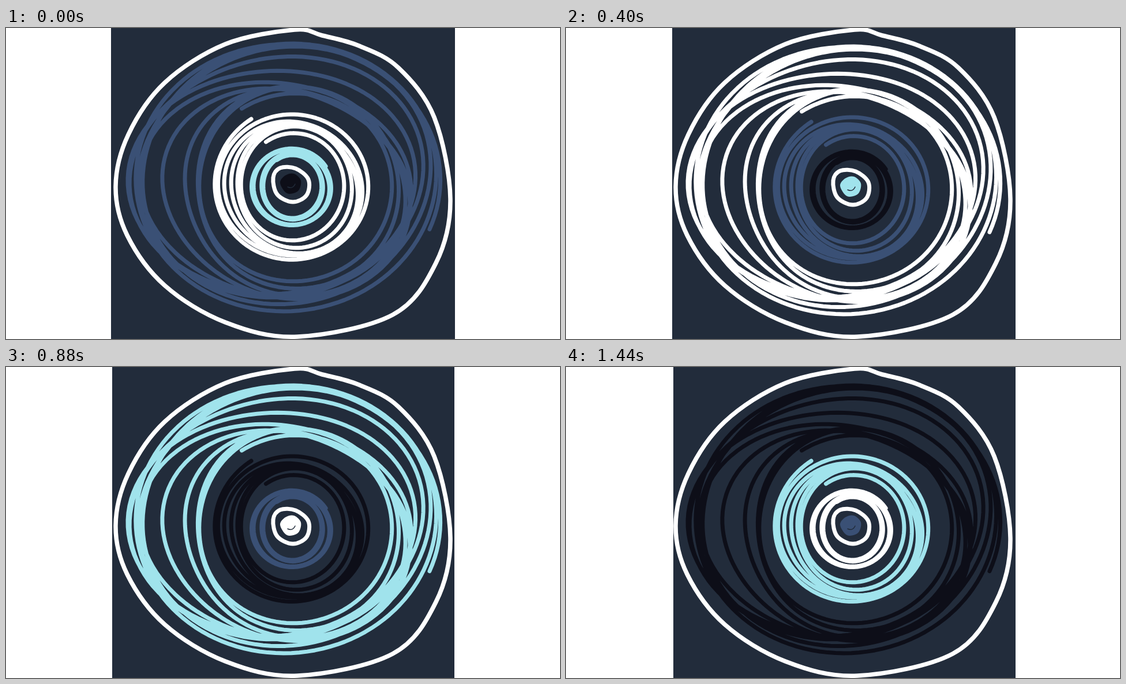
An HTML page with a canvas that plays this animation: 960x540 px, repeating every 1520 ms.

```html
<!DOCTYPE html>
<html lang="en">
<head>
<meta charset="utf-8">
<title>Scribbled eye</title>
<style>
html, body { margin: 0; width: 100%; height: 100%; overflow: hidden; background: #fff; }
canvas { display: block; }
</style>
</head>
<body>
<canvas id="stage" width="960" height="540"></canvas>
<script>
const ctx = document.getElementById('stage').getContext('2d');
const WHITE = '#fff', NAVY = '#222c3b', BLUE = '#3a5075', CYAN = '#a0e3ec', BLACK = '#0d0e18';
const FRAME = 80, LOOP = 1520, TURN = 2 * Math.PI;

// Colours run from the outside in; the panel's edges drift over each phase.
const phases = [
  { start: 0, length: 400, colors: [BLUE, WHITE, CYAN, BLACK], shift: -5, left: [182, 185], right: [778, 778] },
  { start: 400, length: 480, colors: [WHITE, BLUE, BLACK, CYAN], shift: 0, left: [184, 186], right: [779, 775] },
  { start: 880, length: 320, colors: [CYAN, BLACK, BLUE, WHITE], shift: 0, left: [184, 185], right: [777, 775] },
  { start: 1200, length: 320, colors: [BLACK, CYAN, WHITE, BLUE], shift: 0, left: [184, 186], right: [778, 779] }
];

const lerp = (a, b, t) => a + (b - a) * t;

// Smooth closed curve through points (Catmull-Rom as Beziers).
function blob(points) {
  const n = points.length, path = new Path2D();
  path.moveTo(...points[0]);
  for (let i = 0; i < n; i++) {
    const [a, b, c, d] = [n - 1, 0, 1, 2].map(k => points[(i + k) % n]);
    path.bezierCurveTo(b[0] + (c[0] - a[0]) / 6, b[1] + (c[1] - a[1]) / 6,
      c[0] - (d[0] - b[0]) / 6, c[1] - (d[1] - b[1]) / 6, c[0], c[1]);
  }
  path.closePath();
  return path;
}

// A pen winding clockwise from an inner to an outer ellipse [cx, cy, rx, ry].
// power > 1 gathers the loops midway, power < 1 gathers them at both rims;
// swing makes them wander across each other between the rims.
function scribble(inner, outer, turns, power, swing) {
  const path = new Path2D(), steps = turns * 120;
  for (let i = 0; i <= steps; i++) {
    const u = i / steps, v = 2 * u - 1, angle = u * turns * TURN;
    const wander = Math.sin(0.9 * angle) + 0.6 * Math.sin(2.1 * angle);
    const depth = 0.5 + 0.5 * Math.sign(v) * Math.abs(v) ** power
      + swing * Math.sin(Math.PI * u) * wander;
    const [cx, cy, rx, ry] = inner.map((value, k) => lerp(value, outer[k], depth));
    const heading = angle + 0.66 * TURN;
    path.lineTo(cx + rx * Math.cos(heading), cy + ry * Math.sin(heading));
  }
  return path;
}

const outerLoops = scribble([498, 280, 167, 160], [482, 268, 271, 235], 10.4, 1, 0.28);
const middleLoops = scribble([496, 278, 85, 89], [499, 277, 138, 135], 6, 1.4, 0.16);
const innerLoops = scribble([496, 280, 50, 54], [495, 281, 70, 67], 4.25, 0.35, 0.08);

const outline = blob([
  [500, 3], [548, 13], [612, 31], [680, 69], [742, 155], [770, 297], [745, 408],
  [670, 498], [505, 536], [380, 511], [275, 447], [210, 360], [190, 275],
  [212, 185], [275, 95], [380, 28]
]);
const ring = blob([[475, 248], [502, 249], [524, 268], [521, 295], [497, 307], [470, 294], [463, 265]]);
const pupil = blob([[484, 261], [499, 258], [511, 270], [506, 288], [487, 292], [475, 274]]);
const tick = new Path2D('M488 281 Q497 285 501 276');

function stroke(path, color, width) {
  ctx.strokeStyle = color;
  ctx.lineWidth = width;
  ctx.stroke(path);
}

function draw(now) {
  const time = Math.floor(now % LOOP / FRAME) * FRAME;
  const phase = phases.findLast(p => p.start <= time);
  const progress = (time - phase.start) / (phase.length - FRAME);
  const [left, right] = [phase.left, phase.right].map(([a, b]) => Math.round(lerp(a, b, progress)));
  const [outer, middle, inner, core] = phase.colors;

  ctx.fillStyle = WHITE;
  ctx.fillRect(0, 0, 960, 540);
  ctx.fillStyle = NAVY;
  ctx.fillRect(left, 0, right - left, 540);
  ctx.lineCap = ctx.lineJoin = 'round';
  stroke(outline, WHITE, 7.5);

  ctx.save();
  ctx.translate(0, phase.shift);
  stroke(outerLoops, outer, 7);
  stroke(middleLoops, middle, 7);
  stroke(innerLoops, inner, 7);
  stroke(ring, WHITE, 7);
  ctx.fillStyle = core;
  ctx.fill(pupil);
  stroke(tick, NAVY, 1.5);
  ctx.restore();
}

function play() {
  draw(performance.now());
  requestAnimationFrame(play);
}
play();
</script>
</body>
</html>
```
